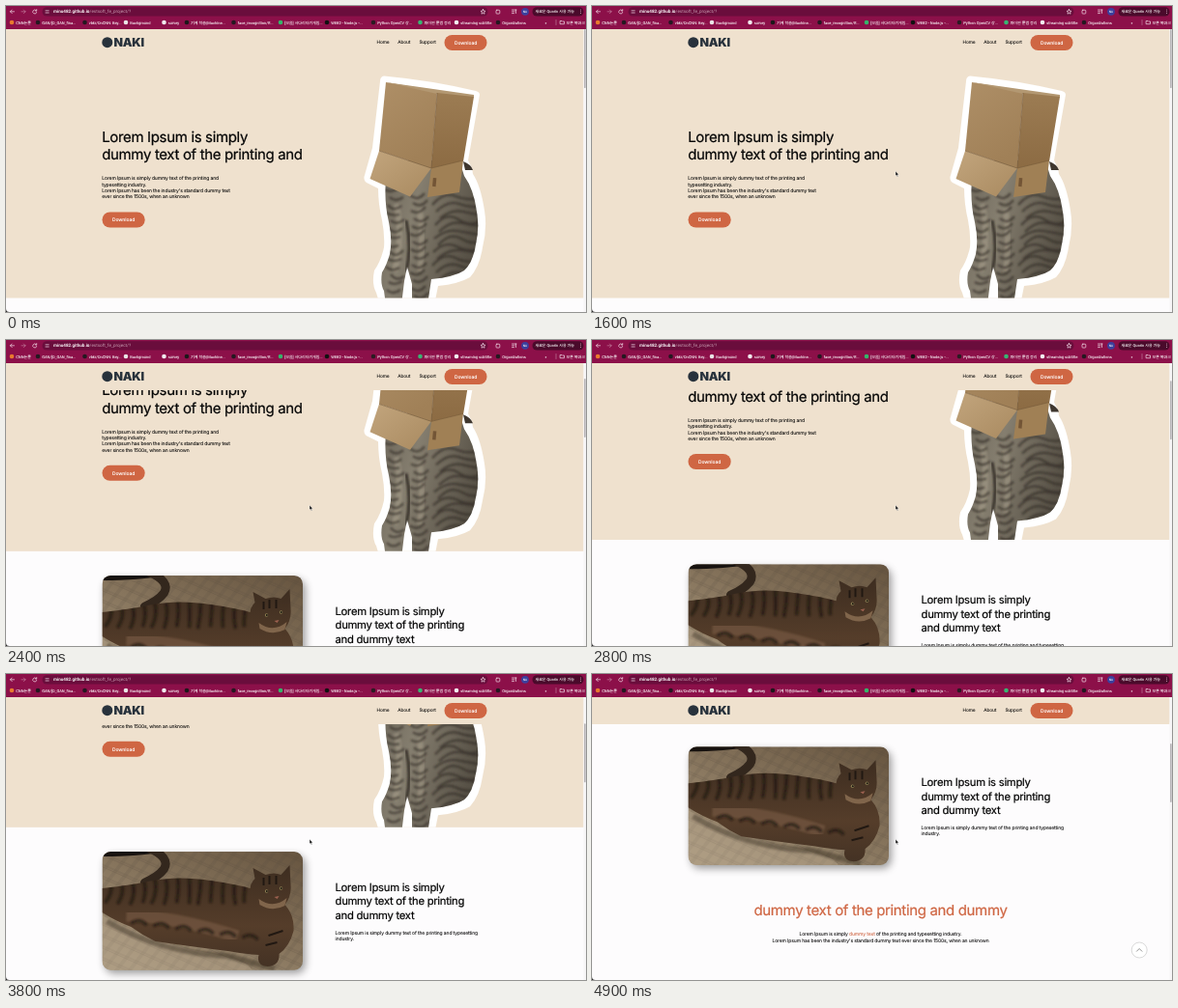
An HTML page for the animation above (5 s loop, 600x317 px).

```html
<!DOCTYPE html>
<html lang="ko">
<head>
<meta charset="utf-8">
<title>Landing page scroll</title>
<style>
html, body { margin: 0; width: 100%; height: 100%; overflow: hidden; background: #fdfcfd; }
svg { display: block; width: 100%; height: 100%; text-rendering: geometricPrecision; }
text { font-family: Inter, sans-serif; white-space: pre; letter-spacing: -.023em; }
.big { font-size: 15px; }
.mid { font-size: 11.25px; }
.body { font-size: 5px; }
.nav { font-size: 4.8px; }
.big, .mid { stroke: currentColor; stroke-width: .22; }
.body, .nav { stroke: currentColor; stroke-width: .06; }
.ink { fill: #060606; color: #060606; }
.btn { font-size: 5px; font-weight: 600; fill: #fff; text-anchor: middle; }
.ui text { font-family: Roboto, "Noto Sans CJK KR", "Noto Sans CJK", sans-serif; font-size: 4px; letter-spacing: 0; fill: #fff; stroke: #fff; stroke-width: .06; }
.accent { fill: #cf6643; color: #cf6643; }
.center { text-anchor: middle; }
.line { fill: none; stroke: #f3dfe8; stroke-width: .7; stroke-linecap: round; stroke-linejoin: round; }
</style>
</head>
<body>
<svg viewBox="0 0 600 317">
  <defs>
    <linearGradient id="boxFront" x1="0" y1="0" x2=".5" y2="1">
      <stop offset="0" stop-color="#ae8f67"/><stop offset="1" stop-color="#a08057"/>
    </linearGradient>
    <linearGradient id="boxSide" x1="0" y1="0" x2="0" y2="1">
      <stop offset="0" stop-color="#9c7c53"/><stop offset="1" stop-color="#8c6b43"/>
    </linearGradient>
    <linearGradient id="flap" x1="0" y1="0" x2="1" y2="1">
      <stop offset="0" stop-color="#c2a57d"/><stop offset="1" stop-color="#a98a60"/>
    </linearGradient>
    <linearGradient id="fur" x1="0" y1="0" x2="1" y2=".4">
      <stop offset="0" stop-color="#6a6458"/><stop offset=".4" stop-color="#857e6f"/><stop offset="1" stop-color="#575146"/>
    </linearGradient>
    <linearGradient id="bed" x1="1" y1="0" x2=".2" y2="1">
      <stop offset="0" stop-color="#66543f"/><stop offset=".5" stop-color="#85735b"/><stop offset="1" stop-color="#a5947a"/>
    </linearGradient>
    <linearGradient id="tabby" x1="0" y1="0" x2="0" y2="1">
      <stop offset="0" stop-color="#3d2d20"/><stop offset=".6" stop-color="#553d2a"/><stop offset="1" stop-color="#443224"/>
    </linearGradient>
    <pattern id="plaid" width="11" height="11" patternUnits="userSpaceOnUse" patternTransform="rotate(24) skewX(-14)">
      <path d="M0 1H11M0 3H11M1 0V11M3 0V11" stroke="#4c4034" stroke-width=".5" opacity=".45"/>
    </pattern>
    <filter id="soft" x="-20%" y="-20%" width="140%" height="150%"><feGaussianBlur stdDeviation="4"/></filter>
    <filter id="blur"><feGaussianBlur stdDeviation=".8"/></filter>
    <clipPath id="frame"><rect width="207.5" height="122.6" rx="8.8"/></clipPath>
    <clipPath id="heroClip"><rect y="24" width="600" height="278.5"/></clipPath>
    <clipPath id="sitClip"><use href="#sit"/></clipPath>
    <clipPath id="lieClip"><use href="#lie"/></clipPath>
  </defs>

  <rect width="600" height="317" fill="#fdfcfd"/>

  <g id="page">
    <rect y="-20" width="597.5" height="322.5" fill="#efe1ce"/>
    <g class="big ink">
      <text x="99.2" y="140.5">Lorem Ipsum is simply</text>
      <text x="99.2" y="159.4">dummy text of the printing and</text>
    </g>
    <g id="intro" class="body ink"></g>
    <rect x="99.5" y="213.5" width="44.2" height="16" rx="8" class="accent"/>
    <text x="121.6" y="223.3" class="btn">Download</text>

    <!-- sitting cat under a box -->
    <g clip-path="url(#heroClip)">
      <path fill="#fff" d="M391 72.5Q387 73 387 78L379 147L370.5 177Q370 182 375 184L385 189Q385 205 389 222Q392 238 391 250Q388 264 381 274Q378 288 383 297L387 310H443L447 290Q468 288 480 281Q490 270 493 250Q498 230 495 212Q491 186 483 174L482 168L478 160L490 92Q490 89 486 88Q440 77 391 72.5Z"/>
      <path id="sit" fill="url(#fur)" d="M393 180Q391 203 396 224Q400 242 397 257Q394 268 389 276Q387 288 391 295L393 310H409L412 285L415 270L420 288V310H436L440 283Q463 281 474 274Q483 266 486 247Q490 230 487 213Q484 190 474 176L469 160H400Z"/>
      <g clip-path="url(#sitClip)">
        <path d="M414 222Q420 250 414 275" fill="none" stroke="#38332b" stroke-width="3" filter="url(#blur)"/>
        <path d="M404 205Q411 240 402 275M428 210Q432 244 428 275" fill="none" stroke="#aaa18e" stroke-width="6" opacity=".5" filter="url(#blur)"/>
        <path id="sitStripes" fill="none" stroke="#312c25" stroke-width="2.2" opacity=".68" filter="url(#blur)"/>
      </g>
      <path fill="url(#boxFront)" d="M393 79L446 88L440 168L386 150Z"/>
      <path fill="#b39872" d="M393 79L484 92L484 95L446 91Z"/>
      <path fill="url(#boxSide)" d="M446 90L484 94L473 161L440 168Z"/>
      <path fill="url(#flap)" d="M386 150L440 168L418 197.5L376.5 179Z"/>
      <path fill="#a08055" d="M440 168L473 160L469 193L436 198Z"/>
      <path d="M386 150L440 168L473 160M446 90L440 168" fill="none" stroke="#765a38" stroke-width=".6"/>
      <rect x="441.5" y="178" width="3.5" height="9" fill="#735536" transform="rotate(5 443 182)"/>
      <path d="M473 161Q481 164 483 170L475 170Z" fill="#3f372f"/>
    </g>

    <!-- lying cat photo -->
    <g transform="translate(99.5 327.7)">
      <rect x="3" y="4" width="207" height="122" rx="9" fill="#000" opacity=".4" filter="url(#soft)"/>
      <g clip-path="url(#frame)">
        <rect width="208" height="123" fill="url(#bed)"/>
        <rect width="208" height="123" fill="url(#plaid)"/>
        <path d="M0 0H64Q40 5 0 5Z" fill="#17120f"/>
        <path d="M48 -4Q71 6 64 18Q58 26 44 32" fill="none" stroke="#33271d" stroke-width="9" stroke-linecap="round"/>
        <path d="M0 66Q55 95 104 104T155 123H0Z" fill="#b8a88e" opacity=".4"/>
        <path d="M5 72Q60 105 130 108L178 121" fill="none" stroke="#2b2119" stroke-width="6" opacity=".4" filter="url(#blur)"/>
        <path id="lie" fill="url(#tabby)" d="M0 38Q28 35 47 31Q75 25 105 29Q135 33 153 38Q153 33 158 28L156 17L169 24Q178 21 185 24L194 14L195 35Q196 46 189 55Q199 66 198 82Q194 98 183 106Q184 118 171 119Q159 118 162 107Q146 106 130 103Q97 99 55 93Q42 87 30 78Q14 72 0 63Z"/>
        <g clip-path="url(#lieClip)">
          <path d="M25 66Q75 67 140 88" fill="none" stroke="#7f6049" stroke-width="13" opacity=".55" filter="url(#blur)"/>
          <path id="lieStripes" fill="none" stroke="#1b140e" stroke-width="3.4" opacity=".65" filter="url(#blur)"/>
          <path d="M162 49Q177 60 191 48L189 56Q176 63 163 55Z" fill="#80654b"/>
          <path d="M167 27V35M173 25V34M180 25V34M172 87L187 82M169 97L181 94" stroke="#211812" stroke-width="2"/>
        </g>
        <circle cx="170" cy="41" r="1.7" fill="#8f8254"/><circle cx="185" cy="38" r="1.7" fill="#8f8254"/>
        <circle cx="170.3" cy="41" r="1" fill="#15110d"/><circle cx="185.2" cy="38" r="1" fill="#15110d"/>
        <path d="M178 47L183 46L181 49Z" fill="#9d6150"/>
      </g>
    </g>

    <g class="mid ink">
      <text x="340.5" y="368.9">Lorem Ipsum is simply</text>
      <text x="340.5" y="383.1">dummy text of the printing</text>
      <text x="340.5" y="397.3">and dummy text</text>
    </g>
    <g class="body ink">
      <text x="340.6" y="413.3">Lorem Ipsum is simply dummy text of the printing and typesetting</text>
      <text x="340.6" y="419.6">industry.</text>
    </g>
    <text x="298.5" y="502.6" class="big accent center">dummy text of the printing and dummy</text>
    <g class="body ink center">
      <text x="298.5" y="523.8">Lorem Ipsum is simply <tspan class="accent">dummy text</tspan> of the printing and typesetting industry.</text>
      <text x="298.5" y="530.1">Lorem Ipsum has been the industry's standard dummy text ever since the 1500s, when an unknown</text>
    </g>
  </g>

  <!-- sticky header -->
  <rect y="23" width="597.5" height="29" fill="#efe1ce"/>
  <circle cx="104.8" cy="37.7" r="5.5" fill="#28323c"/>
  <text x="111.5" y="42.2" font-size="12.4" font-weight="900" fill="#28323c">NAKI</text>
  <g class="nav ink">
    <text x="383.5" y="39.3">Home</text><text x="405.3" y="39.3">About</text><text x="427.4" y="39.3">Support</text>
  </g>
  <rect x="453.5" y="30" width="44" height="16" rx="8" class="accent"/>
  <text x="475.6" y="39.8" class="btn">Download</text>

  <g id="toTop">
    <circle cx="566.2" cy="286" r="8" fill="#fff" stroke="#c9c9c9" stroke-width=".7"/>
    <path d="M563.2 287.5L566.2 284.5L569.2 287.5" fill="none" stroke="#777" stroke-width=".8"/>
  </g>

  <rect x="597.5" y="24" width="2.5" height="293" fill="#f7f6f7"/>
  <rect id="thumb" x="598" width="1.7" height="61" rx=".85" fill="#b9b7b9"/>

  <!-- browser bars -->
  <g class="ui">
    <rect width="600" height="24" fill="#8c1049"/>
    <rect x="37.5" y="1.2" width="461" height="9.4" rx="4.7" fill="#6a0d3c"/>
    <path class="line" d="M8.5 5.8H4.5M6.2 4L4.4 5.8L6.2 7.6"/>
    <path class="line" opacity=".5" d="M16 5.8H20M18.3 4L20.1 5.8L18.3 7.6"/>
    <path class="line" d="M31.3 4.7A2 2 0 1 0 31.7 6.5M31.7 3.6V5H30.3"/>
    <path class="line" d="M41 4.8H44.2M41 7H44.2"/>
    <text x="49" y="7.3" style="font-size:4.6px"><tspan font-weight="500">minu482.github.io</tspan><tspan fill="#c9a0b4" stroke="none">/estsoft_fe_project/?</tspan></text>
    <path class="line" d="M493.5 3.5L494.2 5.1L496 5.3L494.6 6.5L495 8.2L493.5 7.3L492 8.2L492.4 6.5L491 5.3L492.8 5.1Z" stroke-width=".5"/>
    <rect class="line" x="507" y="4.2" width="3.8" height="3.8" rx=".8"/>
    <path class="line" d="M523.5 4H528M523.5 5.8H526M523.5 7.6H525.5M527.5 4V7.5"/>
    <circle cx="537" cy="5.8" r="3.9" fill="#3b3f9d"/>
    <text x="537" y="6.9" class="center" style="font-size:3px">NA</text>
    <rect x="544.5" y="1.2" width="53" height="9.4" rx="4.7" fill="#4a0a2b"/>
    <text x="547.5" y="7.3">새로운 Quorin 사용 가능</text>
    <path d="M594.5 4v.01M594.5 5.8v.01M594.5 7.6v.01" class="line"/>
    <g id="marks"></g>
    <text x="557.5" y="18.5">»</text>
    <path class="line" opacity=".5" d="M569 14.5V19.5"/>
    <path class="line" d="M573.5 15.5H575L575.5 16H577.5V18.7H573.5Z"/>
    <text x="579.5" y="18.5">모든 북마크</text>
  </g>

  <path id="cursor" d="M314 171.2V176L315.1 175L315.9 176.8L316.7 176.5L315.9 174.8H317.4Z" fill="#111" stroke="#fff" stroke-width=".4"/>
  <path d="M0 313.5Q0 317 3.5 317H0Z" fill="#222"/>
</svg>

<script>
const LOOP = 5000, STEP = 100;
const $ = id => document.getElementById(id);

const intro = [
  "Lorem Ipsum is simply dummy text of the printing and",
  "typesetting industry.",
  "Lorem Ipsum has been the industry's standard dummy text",
  "ever since the 1500s, when an unknown"
];
$("intro").innerHTML = intro.map((line, i) =>
  `<text x="99.3" y="${180.4 + i * 6.3}">${line}</text>`).join("");

// icon x, icon colour, label
const marks = [
  [6, "#e8792e", "CNN논문"],
  [33, "#241820", "GAN/[D_GAN_fina..."],
  [81.5, "#241820", "vbkr/DnCNN: Bey..."],
  [124, "#e9e4e6", "Background"],
  [163.5, "#f1eef0", "survey"],
  [187, "#1c171a", "기계 학습(Machine..."],
  [235.5, "#241820", "face_recognition/R..."],
  [284, "#35b56a", "[모음] 사다리타기게임..."],
  [332, "#111", "WEB2 - Node.js -..."],
  [380, "#2a1b22", "Python OpenCV 강..."],
  [428.5, "#38b673", "파이썬 문법 정리"],
  [466, "#f1eef0", "streaming subtitle"],
  [509, "#241820", "Organizations"]
];
$("marks").innerHTML = marks.map(([x, color, label]) =>
  `<circle cx="${x}" cy="17" r="2.3" fill="${color}"/><text x="${x + 4.2}" y="18.5">${label}</text>`).join("");

const repeat = (n, draw) => Array.from({ length: n }, (_, i) => draw(i)).join("");
$("sitStripes").setAttribute("d",
  repeat(14, i => `M${392 + i * 5 % 7} ${190 + i * 8}q6 ${4 + i % 3 * 2} 14 ${i % 4 - 1}M${418 + i * 3 % 5} ${196 + i * 8}q8 ${7 - i % 3} 15 ${-2 - i % 3}`) +
  repeat(12, i => `M${441 + i * 4 % 9} ${206 + i * 7}q12 ${-14 + i % 3 * 2} 24 ${-9 + i % 4}t22 ${2 + i % 3}`));
$("lieStripes").setAttribute("d",
  repeat(13, i => `M${6 + i * 12} ${26 + i % 3}q${8 - i} 13 ${-3 + i % 4} 27`) +
  repeat(6, i => `M${30 + i * 23} ${74 + i * 3}q9 -6 16 2`));

const keys = [[1800, 0], [2000, 65.5], [2800, 95.5], [3400, 116], [4300, 191.4], [4800, 252], [4900, 252.4]];
const rates = keys.slice(1).map(([t, y], i) => (y - keys[i][1]) / (t - keys[i][0]));
const slopes = keys.map((_, i) => {
  const a = rates[i - 1] || 0, b = rates[i] || 0;
  return a * b > 0 ? 2 * a * b / (a + b) : 0;
});

// monotone cubic through the scroll keys
function scrollAt(t) {
  if (t <= keys[0][0]) return 0;
  const i = keys.findIndex(([end]) => t <= end) - 1;
  if (i < 0) return keys[keys.length - 1][1];
  const [t0, y0] = keys[i], [t1, y1] = keys[i + 1];
  const d = t1 - t0, u = (t - t0) / d, v = 1 - u;
  return y0 * (1 + 2 * u) * v * v + slopes[i] * d * u * v * v
    + y1 * u * u * (3 - 2 * u) - slopes[i + 1] * d * u * u * v;
}

const show = (id, on) => $(id).setAttribute("visibility", on ? "visible" : "hidden");

function render(now) {
  const t = Math.floor(now % LOOP / STEP) * STEP;
  const y = scrollAt(t);
  $("page").setAttribute("transform", `translate(0 ${-y})`);
  $("thumb").setAttribute("y", 24 + y * 0.19);
  show("toTop", y > 146);
  show("cursor", t >= 900);
}

const start = performance.now();
function tick() {
  render(performance.now() - start);
  requestAnimationFrame(tick);
}
tick();
</script>
</body>
</html>
```
